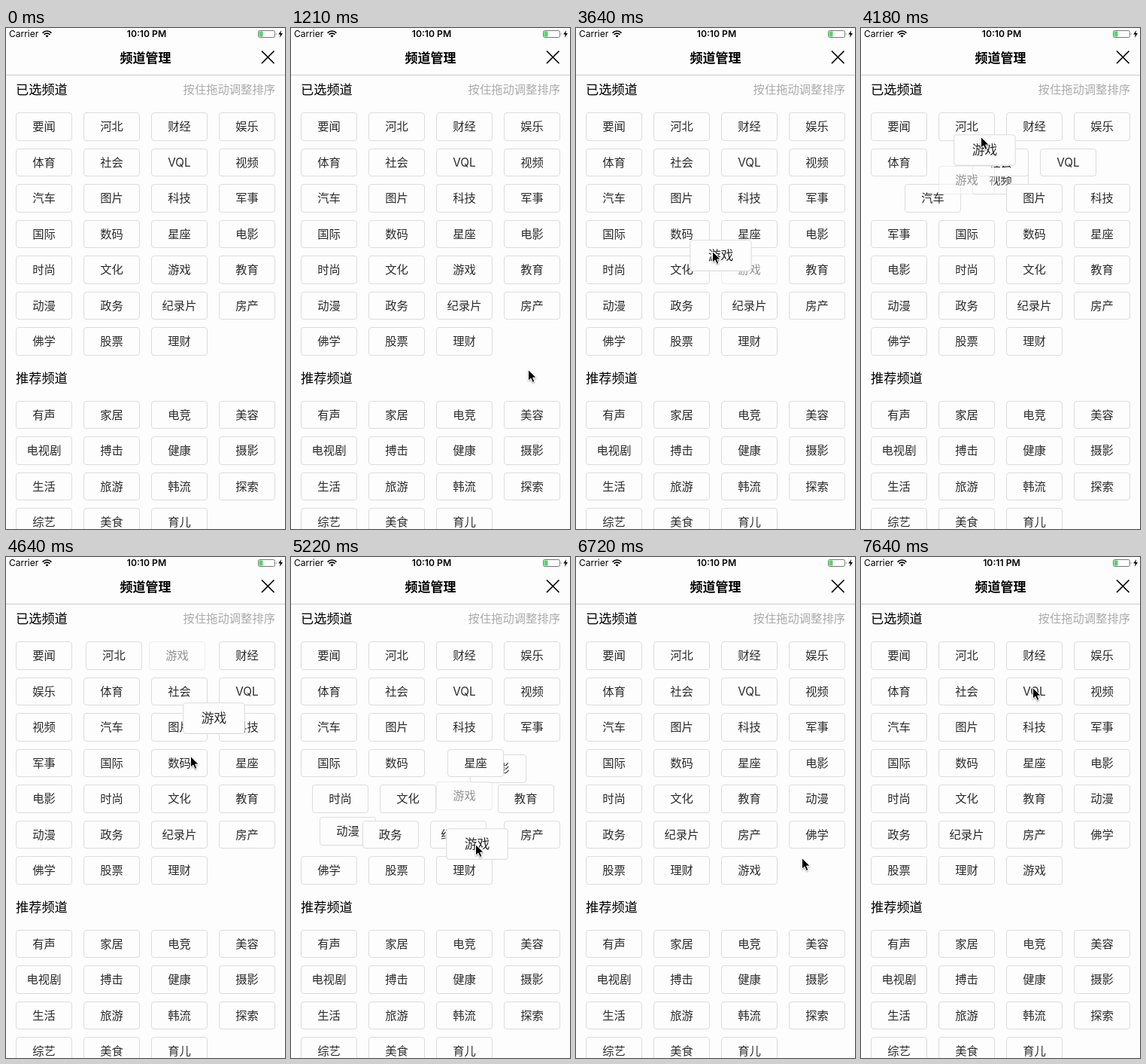
Recreate the animation shown at these times as an HTML page. Size 371 by 665 pixels, loop 8 s.

```html
<!DOCTYPE html>
<html lang="zh-CN">
<head>
<meta charset="utf-8">
<title>频道管理</title>
<style>
html, body { margin: 0; width: 100%; height: 100%; overflow: hidden; }
body { position: relative; background: #fdfdfd; color: #000; font: 15.3px/20px Inter, "Noto Sans CJK SC", "Noto Sans CJK", sans-serif; }
div { position: absolute; white-space: nowrap; box-sizing: border-box; }
svg { position: absolute; left: 0; top: 0; overflow: visible; }
.cell { width: 75px; height: 37.5px; border: 1px solid #dcdcdc; border-radius: 4px; background: #fdfdfd; color: #2b2b2b; line-height: 35.5px; text-align: center; }
.status { font-size: 12px; line-height: 16px; top: 0; }
.heading { font-size: 17.2px; left: 13px; }
#clock { left: 0; width: 374px; text-align: center; font-size: 12.2px; font-weight: 600; }
#title { left: 0; width: 371px; top: 30px; text-align: center; font-size: 17px; font-weight: 600; }
#rule { left: 0; right: 0; top: 62px; height: 1px; background: #cbcbcb; }
#hint { right: 13px; top: 72px; color: #ababab; }
#lifted { z-index: 5; }
#cursor { z-index: 6; filter: drop-shadow(0 1px 1px rgba(0,0,0,.35)); }
</style>
</head>
<body>
<div class="status" style="left:4px">Carrier</div>
<div class="status" id="clock"></div>
<svg width="371" height="62" fill="none">
  <g stroke="#000" stroke-width="1.7">
    <path d="M48.6 6.6a8 8 0 0 1 11.8 0M50.6 8.8a5.2 5.2 0 0 1 7.8 0"/>
    <path d="M54.5 12.6l-2-2.2a2.8 2.8 0 0 1 4 0z" fill="#000" stroke="none"/>
    <path d="M340 30.5l16.5 16.5M356.5 30.5l-16.5 16.5"/>
  </g>
  <rect x="335.5" y="3.5" width="22" height="9" rx="2" stroke="#777"/>
  <rect x="336.5" y="4.5" width="5" height="7" rx="1" fill="#4cd964"/>
  <path d="M359 6.3q1.6 1.7 0 3.4z" fill="#777"/>
  <path d="M366.2 3l-4 5.6h2.6l-1 4.4 4.2-6h-2.7z" fill="#000"/>
</svg>
<div id="title">频道管理</div>
<div id="rule"></div>
<div class="heading" style="top:72px">已选频道</div>
<div id="hint">按住拖动调整排序</div>
<div class="heading" style="top:455px">推荐频道</div>
<svg id="cursor" width="14" height="19">
  <path d="M.5 .5V15.2L3.9 12L6.3 17.4L8.9 16.3L6.6 11.1H11.2Z" fill="#000" stroke="#fff" stroke-linejoin="round"/>
</svg>
<script>
const LOOP = 8000, ENTER = 410, LIFT = 3010, DRAG = 3400, REST = 5800, DROP = 6060, MINUTE = 7640;
const SHIFT_MS = 250, CURSOR_LEAD = 60;
const LEFT = 13, TOP = 112, COLUMN = 90, ROW = 47.5, WIDTH = 75, HEIGHT = 37.5, HOME = 18;
const selected = '要闻 河北 财经 娱乐 体育 社会 VQL 视频 汽车 图片 科技 军事 国际 数码 星座 电影 时尚 文化 游戏 教育 动漫 政务 纪录片 房产 佛学 股票 理财'.split(' ');
const suggested = '有声 家居 电竞 美容 电视剧 搏击 健康 摄影 生活 旅游 韩流 探索 综艺 美食 育儿'.split(' ');

// Centre of the lifted channel at its turning points.
const dragPath = [
  { t: DRAG, x: 230.5, y: 320.5 },
  { t: 3700, x: 183.5, y: 297 },
  { t: 4360, x: 157, y: 111 },
  { t: 4540, x: 272, y: 150 },
  { t: 4640, x: 277, y: 212 },
  { t: 4670, x: 270, y: 250 },
  { t: 4700, x: 247, y: 264 },
  { t: 5040, x: 247, y: 302.5 },
  { t: 5175, x: 247, y: 350 },
  { t: 5220, x: 247.5, y: 381 },
  { t: 5280, x: 247.5, y: 381 },
  { t: REST, x: 254, y: 436.5 }
];
const cursorStart = { x: 362, y: 481 };
const cursorGlides = [
  { from: ENTER, to: 560, x: 315, y: 453 },
  { from: 1210, to: 1930, x: 222.5, y: 319 },
  { from: DRAG, to: REST, x: 251.5, y: 436 },
  { from: DROP, to: 6400, x: 313, y: 439 },
  { from: 6570, to: 7190, x: 228, y: 173 }
];

const cursor = document.getElementById('cursor');
const clock = document.getElementById('clock');
const clamp = v => Math.min(1, Math.max(0, v));
const ease = v => (v = clamp(v)) * v * (3 - 2 * v);
const mix = (a, b, k) => ({ x: a.x + (b.x - a.x) * k, y: a.y + (b.y - a.y) * k });
const slotAt = s => ({ x: LEFT + s % 4 * COLUMN, y: TOP + Math.floor(s / 4) * ROW });

function dragged(t) {
  let p = dragPath[0];
  dragPath.slice(1).forEach((b, i) => {
    const a = dragPath[i];
    if (t > a.t) p = mix(a, b, clamp((t - a.t) / (b.t - a.t)));
  });
  return p;
}

// Slot under a point, or -1 in the gaps between cells.
function hitSlot({ x, y }) {
  const dx = x - LEFT, dy = y - TOP;
  if (dy < 0 || dx % COLUMN > WIDTH || dy % ROW > HEIGHT) return -1;
  return Math.floor(dy / ROW) * 4 + Math.floor(dx / COLUMN);
}

// The dragged channel takes every slot its centre enters.
const moves = [];
for (let t = DRAG, current = HOME; t < REST; t += 2) {
  const slot = hitSlot(dragged(t));
  if (slot >= 0 && slot < selected.length && slot !== current) moves.push({ t, slot: current = slot });
}

function slotOf(i, draggedSlot) {
  if (i === HOME) return draggedSlot;
  const k = i < HOME ? i : i - 1;
  return k < draggedSlot ? k : k + 1;
}

// Overlapping shifts add up, so each one eases on its own clock.
function cellPosition(i, t) {
  let from = slotAt(i), { x, y } = from, crossing = false;
  for (const move of moves) {
    const to = slotAt(slotOf(i, move.slot)), k = ease((t - move.t) / SHIFT_MS);
    x += (to.x - from.x) * k;
    y += (to.y - from.y) * k;
    crossing ||= k > 0 && k < 1 && to.y !== from.y;
    from = to;
  }
  return { x, y, crossing };
}

function cursorPosition(t) {
  if (t >= DRAG && t < REST) {
    const { x, y } = dragged(t + CURSOR_LEAD);
    return { x: x - 2.5, y: y - .5 };
  }
  return cursorGlides.reduce((p, g) => mix(p, g, ease((t - g.from) / (g.to - g.from))), cursorStart);
}

function place(el, { x, y }) {
  el.style.left = x + 'px';
  el.style.top = y + 'px';
}

function addCell(text, position) {
  const el = document.createElement('div');
  el.className = 'cell';
  el.textContent = text;
  place(el, position);
  document.body.append(el);
  return el;
}

const cells = selected.map((text, i) => addCell(text, slotAt(i)));
suggested.forEach((text, i) => {
  const { x, y } = slotAt(i);
  addCell(text, { x, y: y + 382.5 });
});
const lifted = addCell(selected[HOME], slotAt(HOME));
lifted.id = 'lifted';

function render(t) {
  const held = t >= LIFT && t < DROP + SHIFT_MS;
  cells.forEach((el, i) => {
    const position = cellPosition(i, t);
    place(el, position);
    el.style.zIndex = i === HOME ? 3 : position.crossing ? 1 : 2;
  });
  cells[HOME].style.opacity = held ? .5 : 1;

  const settle = ease((t - DROP) / SHIFT_MS);
  const { x, y } = dragged(t);
  place(lifted, mix({ x: x - WIDTH / 2, y: y - HEIGHT / 2 }, cellPosition(HOME, t), settle));
  lifted.style.transform = `scale(${1.1 - .1 * settle})`;
  lifted.style.display = held ? '' : 'none';

  place(cursor, cursorPosition(t));
  cursor.style.display = t < ENTER ? 'none' : '';
  clock.textContent = t < MINUTE ? '10:10 PM' : '10:11 PM';
}

const began = performance.now();
function tick() {
  render((performance.now() - began) % LOOP);
  requestAnimationFrame(tick);
}
tick();
</script>
</body>
</html>
```
